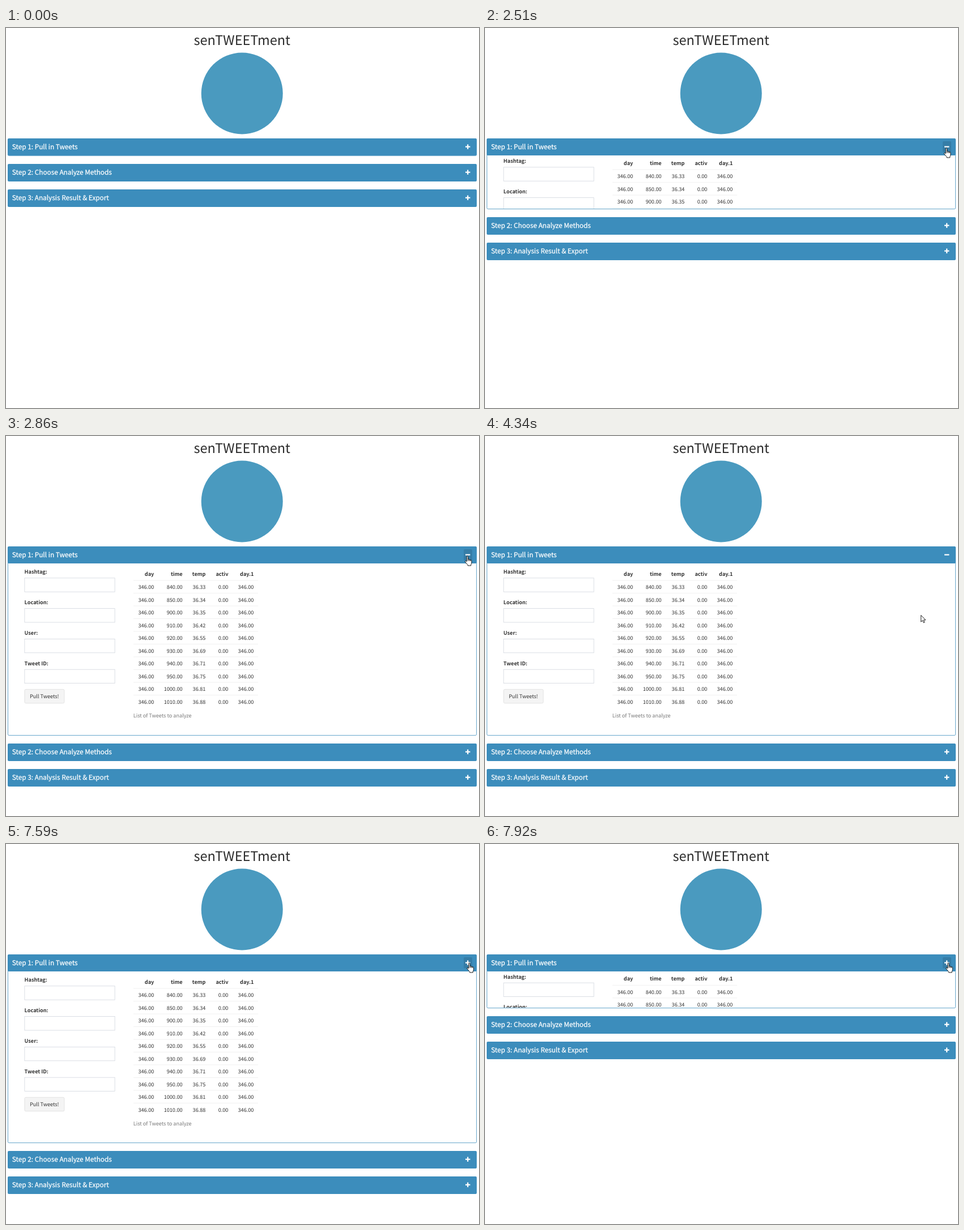
An HTML page that plays this animation: 835x671 px, repeating every 7.99 s.

```html
<!DOCTYPE html>
<html lang="en">
<head>
<meta charset="utf-8">
<title>senTWEETment</title>
<style>
  html, body { margin: 0; width: 100%; height: 100%; overflow: hidden; background: #fff; }
  svg { display: block; width: 835px; height: 671px; }
  text {
    font-family: "Noto Sans CJK JP", "Noto Sans CJK SC", "Noto Sans CJK KR", "Noto Sans CJK TC", "Noto Sans CJK", Lato, sans-serif;
    font-size: 9.14px; fill: #333; text-rendering: geometricPrecision;
  }
  .title { font-size: 23.45px; text-anchor: middle; fill: #2b2b2b; }
  .step { font-size: 11.8px; fill: #fff; stroke: #fff; stroke-width: .25; }
  .bold { font-weight: 700; }
  .right { text-anchor: end; }
  .note { fill: #777; }
  .bar { fill: #3c8dbc; }
  .frame { fill: #fff; stroke: #3c8dbc; stroke-width: .8; }
  .icon { stroke: #fff; stroke-width: 2.2; }
  .hover { fill: #000; fill-opacity: .11; }
  .field { fill: #fff; stroke: #d2d6de; stroke-width: .8; }
  .button { fill: #f4f4f4; stroke: #ddd; stroke-width: .8; }
  .rule { stroke: #f1f1f1; }
  .cursor { fill: #fff; stroke: #000; stroke-width: 1.2; stroke-linejoin: round; }
</style>
</head>
<body>
<svg viewBox="0 0 835 671">
  <defs>
    <clipPath id="clip"><rect id="window" x="3" y="225" width="828" height="0"/></clipPath>
  </defs>
  <text class="title" x="416.7" y="29.6">senTWEETment</text>
  <circle cx="416.7" cy="115.5" r="72" fill="#4a9abf"/>
  <rect id="frame" class="frame" x="3.4" y="195.4" width="827.2" height="30" rx="2"/>
  <g clip-path="url(#clip)"><g id="body"></g></g>
  <g id="bars"></g>
  <g id="cursor" class="cursor">
    <path id="arrow" transform="scale(.73)" d="M.5.5V16.5L4.2 13L6.8 18.7L9.3 17.6L6.8 12H11.8Z"/>
    <path id="hand" transform="translate(-4.4 -.3) scale(.75)"
      d="M4.5 2Q4.5.5 6 .5Q7.5.5 7.5 2V8Q9.6 7 10.3 8.8Q12.3 8 13 9.7Q16 9 16 12V16Q16 18.5 14.5 20.5V23H7V21.3Q4 18 1 14Q.2 12 2 11.6Q3 11.6 4.5 13.5ZM7.5 8V12M10.3 8.8V12M13 9.7V12.5"/>
  </g>
</svg>
<script>
const LOOP = 7990, TICK = 66;
const OPEN_AT = 2322, CLOSE_AT = 7572, SLIDE = 500;
const BODY_HEIGHT = 303, PADDING = 7.2;
const TOPS = [195, 240, 285];

// time, x, y of the pointer tip
const PATH = [
  [590, 775, 662], [900, 792, 500], [1360, 805, 326],
  [1440, 805, 326], [1680, 815, 262], [1900, 814.3, 212],
  [3190, 814.3, 212], [3520, 797, 262], [3870, 765, 317],
  [4140, 765, 317], [4340, 770, 316],
  [5340, 770, 316], [5660, 824, 240], [5870, 821.3, 213],
  [6570, 821.3, 213], [6930, 806, 502], [7310, 819, 213], [7450, 817.8, 210]
];

const $ = id => document.getElementById(id);

function add(parent, tag, attrs, content) {
  const el = document.createElementNS("http://www.w3.org/2000/svg", tag);
  for (const key in attrs) el.setAttribute(key, attrs[key]);
  if (content) el.textContent = content;
  return parent.appendChild(el);
}
const label = (parent, cls, x, y, content) => add(parent, "text", { class: cls, x, y }, content);
const place = (el, x, y) => el.setAttribute("transform", `translate(${x} ${y})`);
const show = (el, on) => { el.style.display = on ? "" : "none"; };

// Collapsible headers
let hover, stem;
const bars = ["Step 1: Pull in Tweets", "Step 2: Choose Analyze Methods", "Step 3: Analysis Result & Export"]
  .map((name, i) => {
    const g = add($("bars"), "g", {});
    add(g, "rect", { class: "bar", x: 3, y: 0, width: 828, height: i ? 31 : 30, rx: 2 });
    label(g, "step", 10.8, 19.1, name);
    if (!i) hover = add(g, "rect", { class: "hover", x: 808, y: 5, width: 15, height: 19.5, rx: 2 });
    add(g, "path", { class: "icon", d: "M811 14.7H819.4" });
    const upright = add(g, "path", { class: "icon", d: "M815.2 10.5V18.9" });
    if (!i) stem = upright;
    place(g, 0, TOPS[i]);
    return g;
  });

// Form
const body = $("body");
["Hashtag:", "Location:", "User:", "Tweet ID:"].forEach((name, i) => {
  const y = i * 53.8;
  label(body, "bold", 32.6, 243.3 + y, name);
  add(body, "rect", { class: "field", x: 32.9, y: 250.8 + y, width: 159.2, height: 24.4 });
});
add(body, "rect", { class: "button", x: 32.9, y: 447.4, width: 70, height: 24.4, rx: 2 });
label(body, "", 42, 463.4, "Pull Tweets!");

// Table
const EDGES = [261.3, 311.6, 352.4, 392.4, 437.4];
const TEMPS = [36.33, 36.34, 36.35, 36.42, 36.55, 36.69, 36.71, 36.75, 36.81, 36.88];
const row = (cls, y, cells) => cells.forEach((c, i) => label(body, cls, EDGES[i], y, c));
const rule = y => add(body, "path", { class: "rule", d: `M225 ${y}H445` });

row("right bold", 247, ["day", "time", "temp", "activ", "day.1"]);
TEMPS.forEach((temp, i) => {
  const minutes = 520 + i * 10;
  const time = Math.floor(minutes / 60) * 100 + minutes % 60;
  rule(255 + i * 22.5);
  row("right", 270.3 + i * 22.5, ["346.00", time.toFixed(2), temp.toFixed(2), "0.00", "346.00"]);
});
label(body, "note", 224.8, 496.8, "List of Tweets to analyze");

const clamp = v => Math.min(1, Math.max(0, v));
const swing = p => 0.5 - Math.cos(Math.PI * clamp(p)) / 2;

// The screen refreshes in coarse ticks
function snap(t) {
  const anchor = t < 5000 ? 2510 : 7590;
  return anchor + Math.floor((t - anchor) / TICK) * TICK;
}

function pointer(t) {
  let i = 0;
  while (i < PATH.length - 2 && t >= PATH[i + 1][0]) i++;
  const [t0, x0, y0] = PATH[i], [t1, x1, y1] = PATH[i + 1];
  const p = swing((t - t0) / (t1 - t0));
  return [x0 + (x1 - x0) * p, y0 + (y1 - y0) * p];
}

function draw(time) {
  const t = snap(time);
  const open = swing((t - OPEN_AT) / SLIDE) - swing((t - CLOSE_AT) / SLIDE);
  const drop = BODY_HEIGHT * open;

  $("frame").setAttribute("height", 30.2 + drop);
  $("window").setAttribute("height", Math.max(0, drop));
  place(body, 0, -PADDING * (1 - open));
  place(bars[1], 0, TOPS[1] + drop);
  place(bars[2], 0, TOPS[2] + drop);
  show(stem, t < OPEN_AT || t >= CLOSE_AT);

  const [x, y] = pointer(t);
  const over = x >= 808 && x <= 823 && y >= 200 && y <= 219.5;
  place($("cursor"), x, y);
  show($("cursor"), t >= PATH[0][0]);
  show($("hand"), over);
  show($("arrow"), !over);
  show(hover, over);
}

const start = performance.now();
function loop() {
  draw((performance.now() - start) % LOOP);
  requestAnimationFrame(loop);
}
loop();
</script>
</body>
</html>
```
